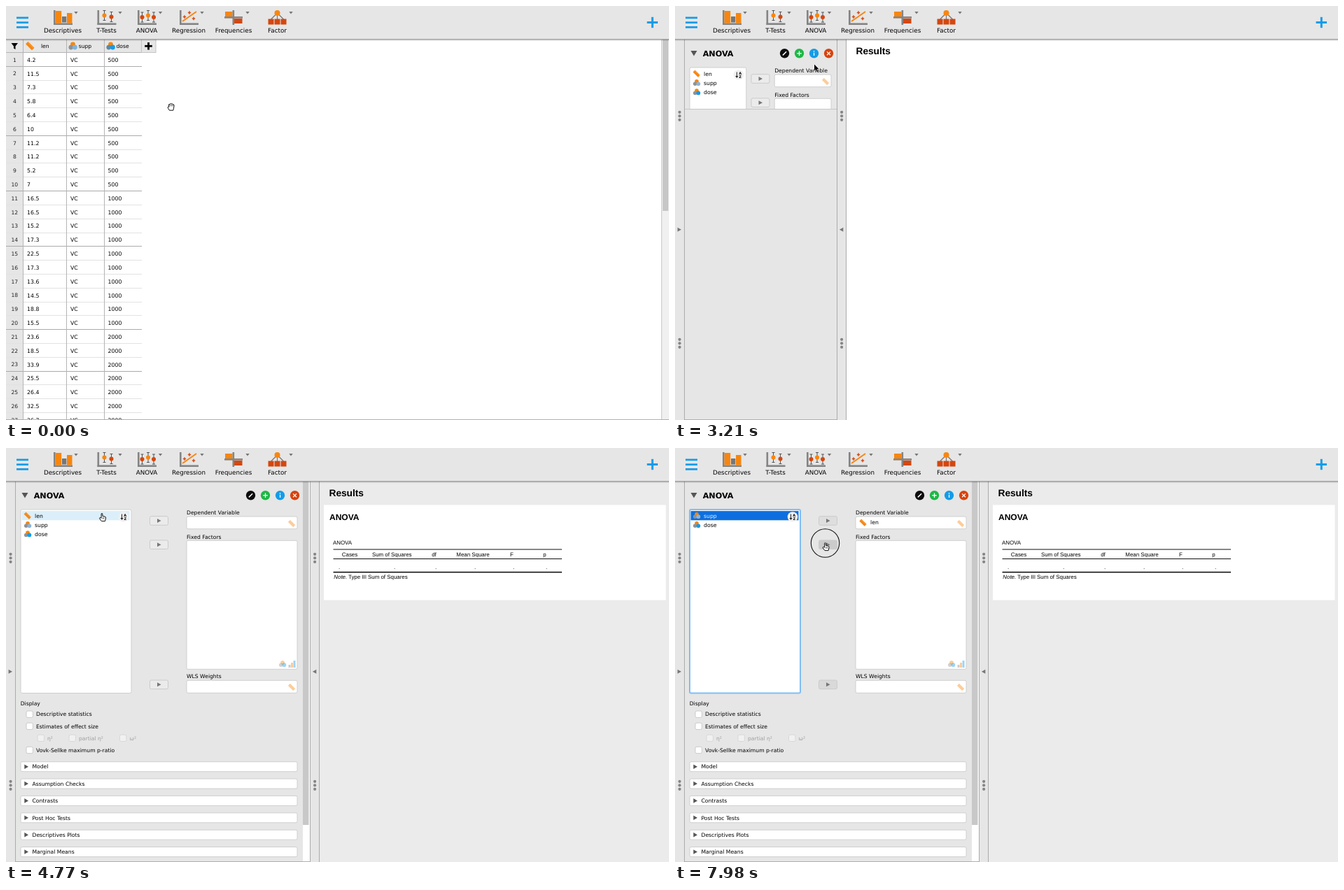
Recreate the animation shown at these times as an HTML page with a canvas. Size 947 by 592 pixels, loop 8 s.

```html
<!DOCTYPE html>
<html lang="en">
<head>
<meta charset="utf-8">
<title>Adding an ANOVA</title>
<style>
html, body { margin: 0; width: 100%; height: 100%; overflow: hidden; background: #fff; }
canvas { display: block; }
</style>
</head>
<body>
<canvas id="stage" width="947" height="592"></canvas>
<script>
const W = 947, H = 592, LOOP = 8000;
const ctx = document.getElementById('stage').getContext('2d');
const SANS = '"DejaVu Sans", sans-serif', ARIAL = '"Liberation Sans", Arial, sans-serif';
const ORANGE = '#f7860f', RED = '#d4470f', BLUE = '#149ce8', GREY = '#848484', PANEL = '#e5e6e5';

// Times of the hard changes
const MENU_OPEN = 990, MENU_CLOSE = 2520, PANEL_START = 3098, PANEL_TIME = 222;
const RESULT_CARD = 3650, SELECT = 5040, ASSIGN = 6570;
const CLICKS = [MENU_OPEN, MENU_CLOSE, SELECT, ASSIGN, 7980];

// Pointer path: time, x, y
const PATH = [
  [0, 236, 144], [120, 236, 144], [880, 198, 39.5], [1350, 198, 39.5], [2150, 199, 83.5],
  [3650, 199, 83.5], [4620, 137, 94], [5300, 137, 94], [6080, 205.5, 101],
  [6900, 205.5, 101], [7700, 214.5, 136], [8000, 214.5, 136]
];

const clamp = v => Math.max(0, Math.min(1, v));
const easeInOut = p => p < .5 ? 2 * p * p : 1 - 2 * (1 - p) ** 2;

function pointerAt(t) {
  const i = Math.max(1, PATH.findIndex(k => k[0] > t));
  const [t0, x0, y0] = PATH[i - 1], [t1, x1, y1] = PATH[i];
  const p = easeInOut(clamp((t - t0) / (t1 - t0)));
  return { x: x0 + (x1 - x0) * p, y: y0 + (y1 - y0) * p };
}

// Drawing helpers
function rect(x, y, w, h, color) {
  ctx.fillStyle = color;
  ctx.fillRect(x, y, w, h);
}
function box(x, y, w, h, fill, stroke, r = 2, line = 1) {
  ctx.beginPath();
  ctx.roundRect(x, y, w, h, r);
  if (fill) { ctx.fillStyle = fill; ctx.fill(); }
  if (stroke) { ctx.strokeStyle = stroke; ctx.lineWidth = line; ctx.stroke(); }
}
function disc(x, y, r, color) {
  ctx.beginPath();
  ctx.arc(x, y, r, 0, 7);
  ctx.fillStyle = color;
  ctx.fill();
}
function line(points, color, width = 1) {
  ctx.beginPath();
  points.forEach(([x, y]) => ctx.lineTo(x, y));
  ctx.strokeStyle = color;
  ctx.lineWidth = width;
  ctx.stroke();
}
function poly(points, color) {
  ctx.beginPath();
  points.forEach(([x, y]) => ctx.lineTo(x, y));
  ctx.closePath();
  ctx.fillStyle = color;
  ctx.fill();
}
function text(s, x, midY, { size = 7.65, color = '#000', align = 'left', style = '', font = SANS } = {}) {
  ctx.font = `${style} ${size}px ${font}`;
  ctx.textAlign = align;
  ctx.fillStyle = color;
  ctx.fillText(s, x, midY + size * .365);
}
function at(x, y, draw, scale = 1, angle = 0) {
  ctx.save();
  ctx.translate(x, y);
  ctx.rotate(angle);
  ctx.scale(scale, scale);
  draw();
  ctx.restore();
}
function faded(alpha, draw) {
  ctx.save();
  ctx.globalAlpha = alpha;
  draw();
  ctx.restore();
}
const cross = (x, y, r, color, width) => {
  line([[x - r, y], [x + r, y]], color, width);
  line([[x, y - r], [x, y + r]], color, width);
};

// Variable type icons
function ruler(x, y, s = 1) {
  at(x, y, () => {
    box(-5.5, -2.2, 11, 4.4, ORANGE, null, .6);
    for (let i = -4; i < 5; i += 2) line([[i, -2.2], [i, -.6]], '#ffd09a', .6);
  }, s, Math.PI / 4);
}
function nominal(x, y, s = 1, left = '#8e9296', right = BLUE) {
  at(x, y, () => {
    disc(0, -2, 3, ORANGE);
    disc(-2.4, 1.6, 2.9, left);
    disc(2.5, 1.6, 3, right);
  }, s);
}

// Toolbar icons
function axes(x) {
  rect(x, 6, 2.6, 21, GREY);
  rect(x, 24.4, 27, 2.6, GREY);
}
function errorBar(x, y, color) {
  line([[x, y - 7], [x, y + 7]], '#555', 1);
  line([[x - 2, y - 7], [x + 2, y - 7]], '#555', 1);
  line([[x - 2, y + 7], [x + 2, y + 7]], '#555', 1);
  disc(x, y, 3, color);
}
function anovaIcon(x, outer = RED) {
  axes(x);
  errorBar(x + 6.5, 16, outer);
  errorBar(x + 15, 13.5, ORANGE);
  errorBar(x + 23, 16, outer);
}
const TOOLS = [
  ['Descriptives', 81, 100, () => {
    axes(68);
    rect(70.6, 7, 8.6, 17.4, ORANGE);
    rect(80, 15, 6.3, 8.5, '#777');
    rect(87, 10, 7.5, 14.4, ORANGE);
  }],
  ['T-Tests', 143.5, 163, () => {
    axes(130.5);
    errorBar(140.5, 13.5, ORANGE);
    errorBar(150.5, 15.5, RED);
  }],
  ['ANOVA', 201, 220.5, () => anovaIcon(188)],
  ['Regression', 261, 280, () => {
    axes(248);
    line([[252, 22], [272, 8]], ORANGE, 2);
    [[255, 15.5], [262, 9.5], [268, 18]].forEach(([x, y]) => cross(x, y, 2.2, RED, 1.4));
  }],
  ['Frequencies', 325, 345, () => {
    rect(313, 8, 10.5, 7, ORANGE);
    rect(326, 18, 11.5, 7, RED);
    rect(312, 15, 26, 2.6, GREY);
    rect(323.5, 6, 2.6, 21, GREY);
  }],
  ['Factor', 387.5, 407, () => {
    [378.5, 387.5, 396.5].forEach(x => {
      line([[387.5, 10], [x, 19]], '#777', 1.2);
      rect(x - 4, 18.5, 8, 8, RED);
    });
    disc(387.5, 10, 4, ORANGE);
  }]
];

function toolbar(menuOpen) {
  rect(0, 0, W, 47, '#e6e6e6');
  if (menuOpen) {
    rect(172.5, 0, 57.5, 47, '#d2d3d3');
    rect(172.5, 0, 1, 47, '#b0b0b0');
    rect(229.5, 0, 1, 47, '#b0b0b0');
  }
  rect(0, 47, W, 1, '#a2a2a2');
  rect(0, 48, W, 1, 'rgba(0,0,0,.22)');
  rect(0, 49, W, 1, 'rgba(0,0,0,.08)');
  [15.5, 22.3, 29].forEach(y => rect(15, y, 17, 2.7, BLUE));
  cross(923.3, 23.5, 7.7, BLUE, 3);
  for (const [label, x, caret, icon] of TOOLS) {
    icon();
    poly([[caret - 2.7, 8], [caret + 2.7, 8], [caret, 11.5]], '#777');
    text(label, x, 35.2, { size: 8.75, align: 'center' });
  }
}

// Data sheet
const LENGTHS = ('4.2 11.5 7.3 5.8 6.4 10 11.2 11.2 5.2 7 16.5 16.5 15.2 17.3 22.5 17.3 13.6 ' +
  '14.5 18.8 15.5 23.6 18.5 33.9 25.5 26.4 32.5 26.7').split(' ');
const STRONG_LINES = [1, 6, 10, 14, 20, 23];

function sheet() {
  const rowH = 19.81, top = 67;
  rect(0, 48, W, H, '#fff');
  rect(0, 48, 25, H, '#e6e6e6');
  rect(0, 48, 214, 19, '#e6e6e6');
  LENGTHS.forEach((len, i) => {
    const mid = top + rowH * (i + .5), size = 7.8;
    text(i + 1, 12.3, mid, { size: 7.6, align: 'center', color: '#222' });
    text(len, 30, mid, { size });
    text('VC', 92, mid, { size });
    text(500 * 2 ** Math.floor(i / 10), 145.5, mid, { size });
    const y = Math.round(top + rowH * (i + 1)) - 1;
    rect(0, y, 194, 1, STRONG_LINES.includes(i + 1) ? '#ababab' : '#e2e2e2');
  });
  rect(0, 66, 194, 1, '#b4b4b4');
  [24, 86, 140].forEach(x => rect(x, 48, 1, H, '#b4b4b4'));
  rect(193, 48, 1, 19, '#c4c4c4');
  rect(213.5, 48, 1, 19, '#c4c4c4');
  rect(193, 66, 21, 1, '#c4c4c4');
  poly([[7.5, 53], [17, 53], [13.5, 57.5], [13.5, 62], [11, 60.5], [11, 57.5]], '#000');
  ruler(34.3, 57, 1.15);
  nominal(95.5, 57.2, 1.15, '#8e9296', '#7fb4da');
  nominal(149.5, 57.2, 1.15, '#5f87a0');
  text('len', 50, 57.2);
  text('supp', 103.7, 57.2);
  text('dose', 157.5, 57.2);
  cross(203.5, 57.3, 5.3, '#000', 2.8);
  rect(937, 48, 10, H, '#f0f0f0');
  rect(936, 48, 1, H, '#c8c8c8');
  rect(938, 48, 8, 245, '#c6c6c6');
  rect(0, 591, W, 1, '#b0b0b0');
}

function menu() {
  ctx.save();
  ctx.shadowColor = 'rgba(0,0,0,.4)';
  ctx.shadowBlur = 5;
  ctx.shadowOffsetY = 1;
  rect(173, 48, 153.5, 166, '#f0f0f0');
  ctx.restore();
  const group = (title, y, color, items) => {
    at(177, y - 10.5, () => { ctx.translate(-188, -5); anovaIcon(188, color); }, .95);
    text(title, 206, y, { size: 8.4, style: 'bold' });
    items.forEach((item, i) => text(item, 179.7, y + 20.4 + i * 13.8, { size: 7.55 }));
  };
  group('Classical', 64.3, RED, ['ANOVA', 'Repeated Measures ANOVA', 'ANCOVA', 'MANOVA']);
  rect(175, 137.5, 150, 1, '#c4c4c4');
  group('Bayesian', 155.8, '#1fb746', ['Bayesian ANOVA', 'Bayesian Repeated Measures ANOVA', 'Bayesian ANCOVA']);
}

// Analysis form
function divider(x, dir) {
  rect(x, 48, 13, H, '#e6e6e6');
  [157.3, 482.3].forEach(y => [-5.5, 0, 5.5].forEach(d => disc(x + 6.6, y + d, 2.1, '#858585')));
  const c = x + 6.2;
  poly([[c - 2.6 * dir, 316.8], [c + 2.8 * dir, 319.8], [c - 2.6 * dir, 322.8]], '#777');
}
function roundButtons(right) {
  ['#0c0c0c', '#1db845', BLUE, '#d8430c'].forEach((color, i) => {
    const x = right - 74.5 + i * 21, y = 67.8;
    disc(x, y, 6.7, color);
    if (i == 0) line([[x - 2.6, y + 2.6], [x + 2.6, y - 2.6]], '#fff', 1.5);
    if (i == 1) cross(x, y, 3.3, '#fff', 1.3);
    if (i == 2) { rect(x - .6, y - 1, 1.3, 4.2, '#fff'); disc(x, y - 2.9, .8, '#fff'); }
    if (i == 3) [1, -1].forEach(s => line([[x - 2.4, y - 2.4 * s], [x + 2.4, y + 2.4 * s]], '#fff', 1.3));
  });
}
function arrowButton(x, y, fill) {
  box(x - 13, y - 6.3, 26, 12.6, fill, '#cbcbcb');
  poly([[x - 2.5, y - 3], [x + 3, y], [x - 2.5, y + 3]], '#777');
}
function variableList(x, w, t, pointer) {
  const names = t < ASSIGN ? ['len', 'supp', 'dose'] : ['supp', 'dose'];
  const selected = t >= SELECT;
  box(x, 88, w, 262.5, '#fff', selected ? '#83bdf3' : '#cfcfcf', 2, selected ? 2 : 1);
  const hovered = t > 3600 && pointer.x < x + w && pointer.y > 89 ? Math.floor((pointer.y - 90) / 13.2) : -1;
  names.forEach((name, i) => {
    const y = 96.7 + i * 13.1, active = selected && i == 0;
    if (active) rect(x + 1.5, y - 6.6, w - 4, 13.2, '#0d6fdf');
    else if (i == hovered) rect(x + 1.5, y - 6.6, w - 4, 13.2, '#dbeffa');
    if (name == 'len') ruler(30.8, y, .95);
    else nominal(31, y, .95, '#8e9296', name == 'dose' ? BLUE : '#8cb4d8');
    text(name, 41, y, { size: 7.75, color: active ? '#e6f1ff' : '#000' });
  });
  const sx = x + w - 11;
  disc(sx, 98.5, 7.3, '#f1f1f1');
  line([[sx - 2.5, 94.5], [sx - 2.5, 102]], '#222', 1);
  poly([[sx - 4.6, 100], [sx - .4, 100], [sx - 2.5, 103]], '#222');
  text('A', sx + 2.3, 96.3, { size: 5, align: 'center', style: 'bold' });
  text('Z', sx + 2.3, 101.3, { size: 5, align: 'center', style: 'bold' });
}
function checkbox(x, y, label, enabled = true) {
  box(x, y - 4.7, 9.4, 9.4, enabled ? '#fff' : '#f1f1f1', enabled ? '#cacaca' : '#d8d8d8');
  text(label, x + 14, y, { color: enabled ? '#000' : '#a0a0a0' });
}
function form(edge, bottom, t, pointer) {
  const scrolled = bottom >= H, right = scrolled ? edge - 10 : edge;
  const x = 21, inner = right - 8 - x, listW = inner * .4, x2 = x + inner - listW, mid = x + inner / 2;
  rect(14, 48, edge - 14, H, PANEL);
  ctx.save();
  ctx.beginPath();
  ctx.rect(14, 48, edge - 14, bottom - 48);
  ctx.clip();

  poly([[22.5, 64], [31.5, 64], [27, 71.5]], '#555');
  text('ANOVA', 39.7, 68, { size: 11.2, style: 'bold' });
  roundButtons(right);
  variableList(x, listW, t, pointer);

  const selected = t >= SELECT;
  const over = y => pointer.x > mid - 14 && t > 5300 && Math.abs(pointer.y - y) < 6.5;
  arrowButton(mid, 104, over(104) ? '#cfcfcf' : t >= ASSIGN ? '#dedede' : '#ebebeb');
  arrowButton(mid, 138.2, over(138.2) ? '#cbcbcb' : selected ? '#d9d9d9' : '#ebebeb');
  arrowButton(mid, 338.3, t >= ASSIGN ? '#d9d9d9' : '#ebebeb');

  text('Dependent Variable', x2, 92.3);
  box(x2, 98, listW, 17.7, '#fff', '#cfcfcf');
  text('Fixed Factors', x2, 126.8);
  box(x2, 132.3, listW, 184, '#fff', '#cfcfcf');
  text('WLS Weights', x2, 326.5);
  box(x2, 332.3, listW, 18, '#fff', '#cfcfcf');
  const iconX = x2 + listW - 8;
  faded(.42, () => {
    ruler(iconX, 108, .95);
    ruler(iconX, 342, .95);
    nominal(iconX - 13, 308.7, .95);
    [[-4.5, 4, GREY], [-1, 7, ORANGE], [2.5, 10, BLUE]].forEach(([d, h, c]) => rect(iconX + d, 314 - h, 3, h, c));
  });
  if (t >= ASSIGN) {
    ruler(x2 + 10.5, 106.7, .95);
    text('len', x2 + 21, 106.3, { size: 7.75 });
  }

  text('Display', 20.7, 365.5);
  checkbox(29, 380.7, 'Descriptive statistics');
  checkbox(29, 397.8, 'Estimates of effect size');
  checkbox(45, 414.8, 'η²', false);
  checkbox(90, 414.8, 'partial η²', false);
  checkbox(162.5, 414.8, 'ω²', false);
  checkbox(29, 432, 'Vovk-Sellke maximum p-ratio');
  ['Model', 'Assumption Checks', 'Contrasts', 'Post Hoc Tests', 'Descriptives Plots', 'Marginal Means'].forEach((label, i) => {
    const y = 455.7 + i * 24.36;
    box(x, y - 7, inner, 14, '#fff', '#cfcfcf');
    poly([[26.3, y - 3.3], [32, y], [26.3, y + 3.3]], '#555');
    text(label, 37.5, y);
  });
  ctx.restore();
  if (scrolled) {
    rect(424, 48, 10, H, '#fff');
    rect(424, 48, 8.5, 491, '#c8c8c8');
  } else rect(14, bottom - 1, edge - 14, 1, '#c6c6c6');
}

// Results pane
function results(x, t) {
  rect(x, 48, W - x, H, t < 3255 ? '#fff' : '#ebebeb');
  const arial = { size: 7.9, font: ARIAL }, centered = { ...arial, align: 'center' };
  const heading = size => ({ size, font: ARIAL, style: 'bold' });
  if (t >= RESULT_CARD) {
    rect(454, 81.5, 488.5, 136, '#fff');
    text('ANOVA', 462, 98.5, heading(12));
    text('ANOVA', 467, 135.3, arial);
    [[144.5, 1], [158, 1], [176.8, 1.6]].forEach(([y, h]) => rect(467.5, y, 326.5, h, '#111'));
    [['Cases', 491, 476], ['Sum of Squares', 551.2, 555], ['df', 611.5, 614], ['Mean Square', 667, 670],
      ['F', 722.3, 725], ['p', 769.5, 772]].forEach(([label, cx, dot]) => {
      text(label, cx, 152.3, centered);
      text('.', dot, 170.3, centered);
    });
    text('Note.', 468.3, 184, { ...arial, style: 'italic' });
    text('Type III Sum of Squares', 489, 184, arial);
  }
  text('Results', x + 13.5, 64, heading(13.7));
}

function workspace(t, pointer) {
  const edge = Math.round(14 + 420 * easeInOut(clamp((t - PANEL_START) / PANEL_TIME)));
  const bottom = Math.round(Math.max(48, Math.min(H, 148 + (t - 3211) * 142 / 90)));
  form(edge, bottom, t, pointer);
  results(edge + 14, t);
  divider(0, 1);
  divider(edge + .5, -1);
  [13, edge, edge + 13].forEach(x => rect(x, 48, 1, H, '#ababab'));
  rect(14, 591, edge - 14, 1, '#b0b0b0');
}

// Pointer shapes
const SHAPES = {
  arrow: 'M0 0V9.2L2.1 7.3 3.6 10.8 5.1 10.1 3.7 6.8H6.6Z',
  grab: 'M-2.6 5.2L-4.9 1.4Q-5.2-.6-3.2.3L-3.6-3Q-3-4.4-2-3.2-1-5.8.2-3.8 1.5-5.4 2.2-3.2 3.8-3.8 4.2-1.8L3.4 2.8 2.8 5.2Z',
  finger: 'M-.9 0Q0-1.2.9 0V3.4L4 4Q5.7 4.3 5.5 6L4.6 10.6H-.6L-3.4 6.8Q-3.4 5-1.8 5.6L-.9 6.3Z'
};
function pointerShape({ x, y }, t) {
  const kind = t < MENU_OPEN && y > 48 ? 'grab' : t > 4000 && y > 88 && (x < 179 || x > 204) ? 'finger' : 'arrow';
  at(x, y, () => {
    const path = new Path2D(SHAPES[kind]), dark = kind == 'arrow';
    ctx.lineJoin = 'round';
    ctx.fillStyle = dark ? '#000' : '#fff';
    ctx.strokeStyle = dark ? '#fff' : '#111';
    ctx.lineWidth = 1;
    if (dark) ctx.stroke(path);
    ctx.fill(path);
    if (!dark) ctx.stroke(path);
    if (kind == 'grab') [-1.8, .3, 2.3].forEach(d => line([[d, -3], [d, -.6]], '#111', .7));
    if (kind == 'finger') [1.2, 2.9].forEach(d => line([[d, 5], [d, 7.8]], '#111', .6));
  });
  if (CLICKS.some(c => t > c - 100 && t < c + 60)) {
    ctx.beginPath();
    ctx.arc(x, y, 20.2, 0, 7);
    ctx.strokeStyle = '#111';
    ctx.lineWidth = 1.1;
    ctx.stroke();
  }
}

function render(t) {
  const pointer = pointerAt(t), menuOpen = t >= MENU_OPEN && t < MENU_CLOSE;
  ctx.textRendering = 'geometricPrecision';
  if (t < PANEL_START) sheet();
  else workspace(t, pointer);
  toolbar(menuOpen);
  if (menuOpen) menu();
  pointerShape(pointer, t);
}

const start = performance.now();
function tick() {
  render((performance.now() - start) % LOOP);
  requestAnimationFrame(tick);
}
tick();
</script>
</body>
</html>
```
